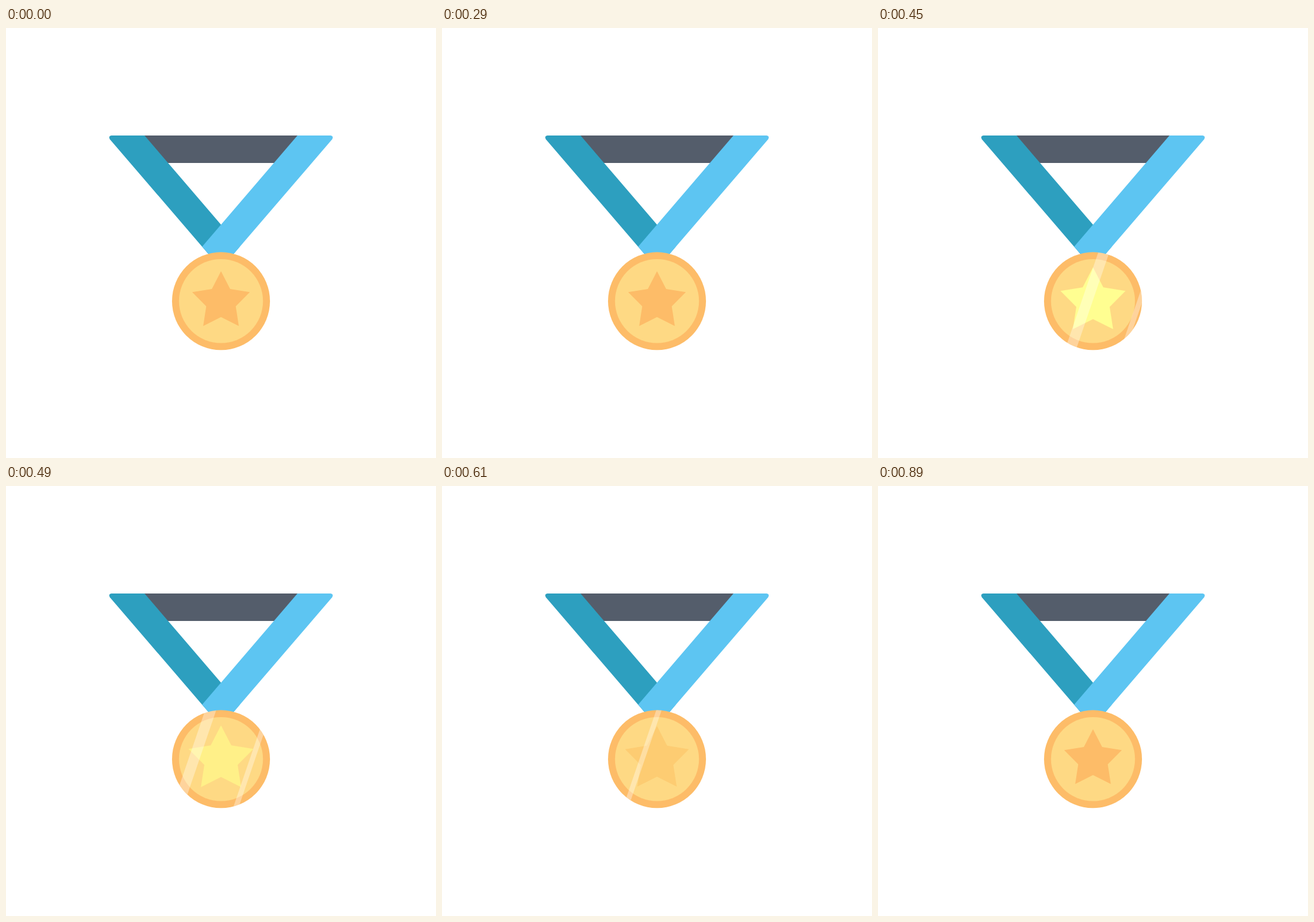
An HTML page that plays this animation: 720 px wide and 720 px high, repeating every 1010 ms.

```html
<!DOCTYPE html>
<html lang="en">
<head>
<meta charset="utf-8">
<title>Medal</title>
<style>
  html, body { margin: 0; width: 100%; height: 100%; overflow: hidden; background: #fff; }
  svg { display: block; width: 100%; height: 100%; }
</style>
</head>
<body>
<svg viewBox="0 0 720 720">
  <defs>
    <clipPath id="disc"><circle cx="360" cy="457.300" r="82"/></clipPath>
    <path id="strap" d="M488 180H543Q545 180 546.200 181.200Q548 183 546 186.500L372 389H348L328.500 366Z"/>
  </defs>
  <path fill="#545d6b" d="M230 180H490L450 226H270Z"/>
  <use href="#strap" fill="#2d9fbf" transform="matrix(-1 0 0 1 720 0)"/>
  <use href="#strap" fill="#5dc5f2"/>
  <circle cx="360" cy="457.300" r="82" fill="#fdbc68"/>
  <circle cx="360" cy="457.300" r="70.300" fill="#fed984"/>
  <polygon id="star"/>
  <g clip-path="url(#disc)" fill="#fff" fill-opacity=".34">
    <path id="wide"/>
    <path id="thin"/>
  </g>
</svg>
<script>
const LOOP = 1010, START = 210, STEP = 40, END = 890;
const RISE = 290, PEAK = 450, DIM = 690, REST = 730;
const [star, wide, thin] = ['star', 'wide', 'thin'].map(id => document.getElementById(id));
const orange = [253, 188, 104], yellow = [255, 254, 145];

star.setAttribute('points', Array.from({ length: 10 }, (_, i) => {
  const r = i % 2 ? 26 : 50.7, a = i * Math.PI / 5;
  return [r * Math.sin(a), -r * Math.cos(a)];
}).join(' '));

const part = (t, from, to) => Math.min(1, Math.max(0, (t - from) / (to - from)));

// Slanted band whose left edge crosses the medal's middle height at x
function band(path, x, w) {
  const h = 90, d = h * 0.342;
  path.setAttribute('d', `M${x + d} ${457 - h}h${w}L${x + w - d} ${457 + h}h${-w}Z`);
}

function draw(now) {
  let t = now % LOOP;
  t = t < START ? 0 : Math.min(END, START + Math.floor((t - START) / STEP) * STEP);
  const up = part(t, RISE, PEAK);
  const glow = up * (1 - part(t, PEAK, DIM)) ** 1.3;
  const size = 1 + 0.13 * up ** 2 * (1 - part(t, PEAK, REST) ** 3);
  const rgb = orange.map((c, i) => Math.round(c + (yellow[i] - c) * glow));
  star.setAttribute('fill', `rgb(${rgb})`);
  star.setAttribute('transform', `translate(360 458) scale(${size})`);
  band(wide, 341 - (t - PEAK) * 0.885, 18.5);
  band(thin, 434 - (t - PEAK) * 0.645, 9);
  requestAnimationFrame(draw);
}
draw(0);
</script>
</body>
</html>
```
